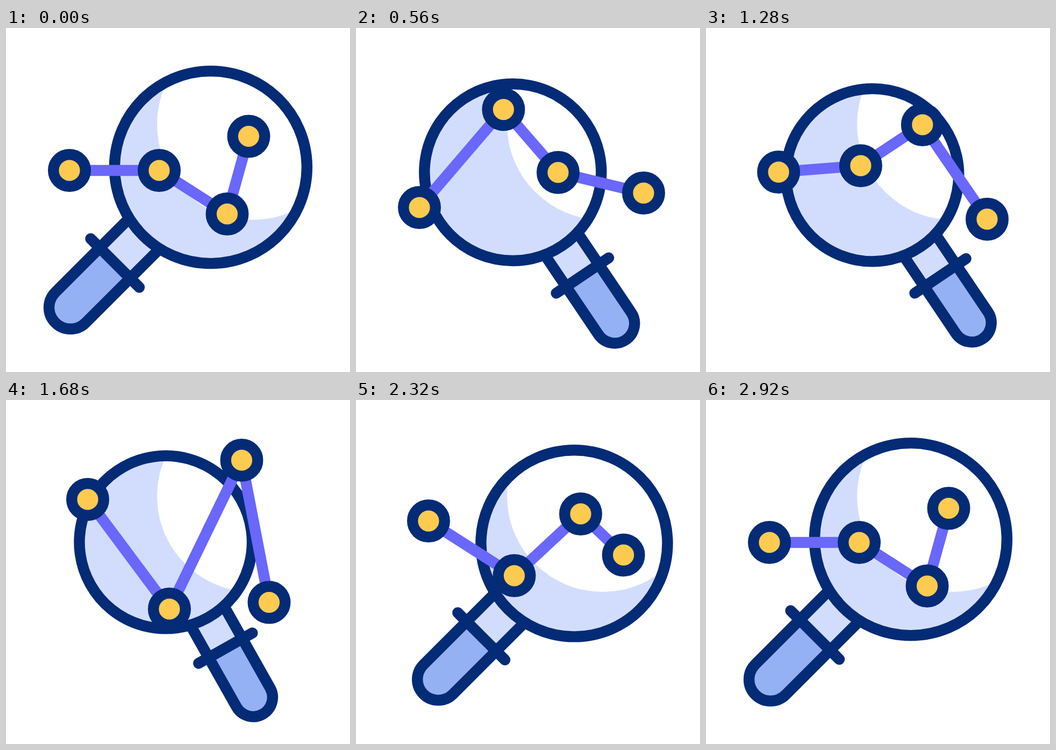
These frames come from a looping animation (640x640 px, 3000 ms). An HTML page without scripts:

```html
<!DOCTYPE html>
<html lang="en">
<head>
<meta charset="utf-8">
<title>Search chart</title>
<style>
  html, body { margin: 0; width: 100%; height: 100%; overflow: hidden; background: #fff; }
  svg { display: block; width: 100%; height: 100%; }

  .swing, .zoom, .chart {
    animation: 3s cubic-bezier(.333, 0, .667, 1) infinite;
  }
  /* the glass turns about a point on its handle and resizes about the handle's end */
  .swing { transform-origin: 254.3px 385.7px; animation-name: move, turn; }
  .zoom { transform-origin: 120px 520px; animation-name: zoom; }
  .chart { animation-name: chart; }

  .ink, .chart { fill: none; stroke: #042b76; stroke-width: 20.4; stroke-linecap: round; stroke-linejoin: round; }
  .ink * { vector-effect: non-scaling-stroke; }
  .chart { stroke: #6a67fb; stroke-linecap: butt; }
  .pale { fill: #d2ddfe; }
  .grip { fill: #94b1f3; }

  @keyframes move {
    0%, 2.667% { translate: 0 0; }
    25.333%, 32% { translate: 152.5px 8.2px; }
    53.333%, 54.667% { translate: 116.2px 2.2px; }
    64% { translate: 51px -.3px; }
    97.333%, 100% { translate: 0 0; }
  }
  @keyframes turn {
    0%, 2.667% { rotate: 0deg; }
    13.333%, 54.667% { rotate: -79deg; }
    64%, 100% { rotate: 0deg; }
  }
  @keyframes zoom {
    0%, 2.667% { scale: 1; }
    25.333%, 68% { scale: .898; }
    82.667%, 100% { scale: 1; }
  }
  /* the last move is curved, so its ease is split over four stretches */
  @keyframes chart {
    0%, 2.667% { d: path("M118 265L285 265L411.5 346L451.5 201.5"); }
    25.333%, 32% { d: path("M118 352L271.6 122L366.7 248.6L556.8 334.6"); }
    53.333% { d: path("M152 185L304 389L438.5 112L489.5 376.5"); }
    60% {
      d: path("M152 185L304 389L438.5 112L489.5 376.5");
      animation-timing-function: cubic-bezier(.333, 0, .667, .394);
    }
    68% {
      d: path("M147.5 196L301.5 372L431.5 136L497 352");
      animation-timing-function: cubic-bezier(.333, .262, .667, .631);
    }
    77.333% {
      d: path("M135 225L294.5 327L418 211.5L497.8 288.7");
      animation-timing-function: cubic-bezier(.333, .369, .667, .738);
    }
    86.667% {
      d: path("M122.5 254L287.5 282L412 305.5L469.5 225");
      animation-timing-function: cubic-bezier(.333, .606, .667, 1);
    }
    94.667%, 100% { d: path("M118 265L285 265L411.5 346L451.5 201.5"); }
  }
</style>
</head>
<body>
<svg viewBox="0 0 640 640">
  <defs>
    <marker id="node" markerUnits="userSpaceOnUse" markerWidth="90" markerHeight="90" overflow="visible">
      <circle r="29.8" fill="#fecb50" stroke="#042b76" stroke-width="20.4"/>
    </marker>
  </defs>

  <g class="swing"><g class="zoom">
    <circle class="pale" cx="381" cy="259" r="179"/>
  </g></g>

  <!-- fixed glare -->
  <circle cx="459" cy="179" r="178" fill="#fff"/>

  <g class="swing"><g class="zoom">
    <g class="ink" transform="translate(120 520) rotate(45)">
      <path class="pale" stroke="none" d="M-40 -117V-194H40V-117z"/>
      <path class="grip" stroke="none" d="M-40 -117V0a40 40 0 0 0 80 0V-117z"/>
      <path stroke-linecap="butt" d="M-40 -194V0a40 40 0 0 0 80 0V-194"/>
      <path d="M-64 -117H64"/>
      <circle cy="-369" r="179"/>
    </g>
  </g></g>

  <path class="chart" d="M118 265L285 265L411.5 346L451.5 201.5"
    marker-start="url(#node)" marker-mid="url(#node)" marker-end="url(#node)"/>
</svg>
</body>
</html>
```
